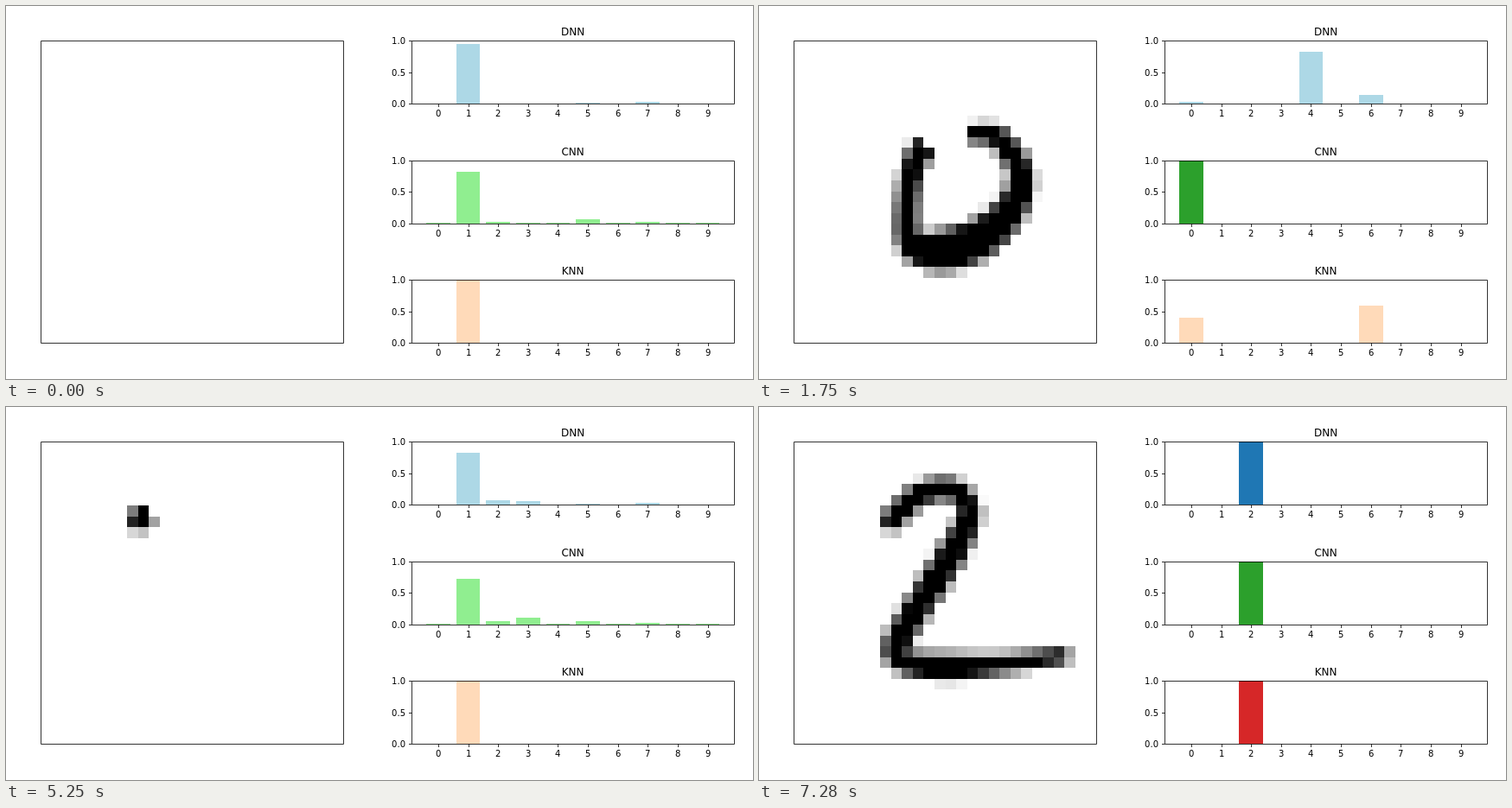
Animation of 864x432 px, one loop 8 s. Source, as an HTML page with a canvas:

```html
<!DOCTYPE html>
<html lang="en">
<head>
<meta charset="utf-8">
<title>Digit classifiers</title>
<style>
html, body { margin: 0; width: 100%; height: 100%; overflow: hidden; background: #fff; }
canvas, svg { position: absolute; left: 0; top: 0; width: 864px; height: 432px; }
svg { font: 10px "DejaVu Sans", sans-serif; }
svg path { fill: none; stroke: #000; stroke-width: .8; }
.title { font-size: 12px; }
</style>
</head>
<body>
<canvas id="stage" width="864" height="432"></canvas>
<svg id="axes" viewBox="0 0 864 432"></svg>
<script>
const LOOP = 8000, STEP = 70;
const GRID = 28, CELL = 351 / GRID;
const FIRST = 499.9, PITCH = 34.63, HEIGHT = 72.84;

const charts = [
  { name: 'DNN', pale: '#add8e6', strong: '#1f77b4' },
  { name: 'CNN', pale: '#90ee90', strong: '#2ca02c' },
  { name: 'KNN', pale: '#ffdab9', strong: '#d62728' }
].map((chart, i) => ({ ...chart, top: 40.3 + i * 138.55 }));

// Scores are given per chart as { digit: score }.
const blank = [
  { 1: .95, 5: .01, 7: .03 },
  { ...Array(10).fill(.01), 1: .82, 2: .02, 5: .06, 7: .02 },
  { 1: 1 }
];

// stroke: key pen positions [x, y, radius] in grid cells, joined by a smooth curve.
// moods: [step, ...scores], blended in between.
const digits = [
  {
    label: 0, start: 0, steps: 30, lead: 1.1,
    stroke: [
      [16.4, 8.7, .75], [18.9, 9.1, 1], [20.9, 12.2, 1.15], [20.3, 15.2, 1.4],
      [17.6, 18.1, 1.8], [13.7, 19.5, 1.9], [10.8, 18.7, 1.2], [10.6, 14.2, 1],
      [11.6, 10.6, 1.1], [13.6, 9, 1], [16.4, 8.7, .75]
    ],
    moods: [
      [17, { 2: .22, 4: .03, 7: .74 }, { 0: .12, 2: .83, 6: .01, 9: .02 }, { 2: .4, 3: .2, 7: .4 }],
      [25, { 0: .03, 4: .82, 6: .14 }, { 0: 1 }, { 0: .4, 6: .6 }],
      [30, { 0: .8, 4: .1, 6: .1 }, { 0: 1 }, { 0: 1 }]
    ]
  },
  {
    label: 1, start: 2940, steps: 18, lead: .5,
    stroke: [
      [17.5, 5.8, .85], [16.6, 10, .85], [15.5, 14, .8], [14.2, 17.8, .75], [14.05, 22.1, .5]
    ],
    moods: [[18, { 1: .84, 7: .16 }, { 1: 1 }, { 1: 1 }]]
  },
  {
    label: 2, start: 5180, steps: 30, lead: -.4,
    stroke: [
      [9.1, 7.3, 1], [11.5, 5.1, 1.05], [14.5, 4.5, 1], [16.2, 6.6, 1.05], [14.6, 10.4, 1.3],
      [11.4, 15.5, 1.25], [9.5, 19, 1.2], [10.6, 20.5, 1.1], [14.5, 20.9, 1.2],
      [19.5, 20.6, .85], [24.7, 19.9, .75]
    ],
    moods: [
      [8, { 2: .51, 3: .41, 5: .05 }, { 2: .23, 3: .77 }, { 1: 1 }],
      [23, { 2: .97, 3: .02 }, { 2: .97, 8: .02 }, { 2: 1 }],
      [30, { 2: 1 }, { 2: 1 }, { 2: 1 }]
    ]
  }
];

const colX = col => Math.round(40 + col * CELL);
const rowY = row => Math.round(39 + row * CELL);
const crisp = v => Math.round(v) + .5;
const mix = (a, b, k) => a + (b - a) * k;

// Catmull-Rom curve through the key points, as dots with their distance along it.
function smooth(points, density = 24) {
  const dots = [];
  const key = i => points[Math.max(0, Math.min(points.length - 1, i))];
  let length = 0;
  for (let n = 0; n <= (points.length - 1) * density; n++) {
    const i = Math.floor(n / density), t = n / density - i;
    const [x, y, radius] = [0, 1, 2].map(axis => {
      const [a, b, c, d] = [-1, 0, 1, 2].map(offset => key(i + offset)[axis]);
      return b + t / 2 * (c - a + t * (2 * a - 5 * b + 4 * c - d + t * (3 * (b - c) + d - a)));
    });
    const last = dots[dots.length - 1];
    if (last) length += Math.hypot(x - last.x, y - last.y);
    dots.push({ x, y, radius, at: length });
  }
  return { dots, length };
}

// Each inked cell keeps its darkness and the place on the stroke that inks it most.
function rasterize(digit) {
  const { dots, length } = smooth(digit.stroke);
  digit.length = length;
  digit.cells = [];
  for (let row = 0; row < GRID; row++) for (let col = 0; col < GRID; col++) {
    let ink = 0, at = 0;
    for (const dot of dots) {
      const here = dot.radius + .5 - Math.hypot(col + .5 - dot.x, row + .5 - dot.y);
      if (here > ink) { ink = here; at = dot.at; }
    }
    if (ink > .02) digit.cells.push({ col, row, at, shade: Math.round(255 * (1 - Math.min(1, ink))) });
  }
}

function scoresAt(digit, index, step) {
  const moods = [[0, ...blank], ...digit.moods];
  const next = Math.max(1, moods.findIndex(mood => mood[0] >= step));
  const from = moods[next - 1], to = moods[next];
  const k = (step - from[0]) / (to[0] - from[0]);
  return Array.from({ length: 10 }, (_, i) => {
    const score = mix(from[index + 1][i] || 0, to[index + 1][i] || 0, k);
    return index === 2 ? Math.round(score * 5) / 5 : score; // five neighbours vote
  });
}

function buildAxes() {
  const text = (x, y, anchor, label, name = '') =>
    `<text class="${name}" x="${x}" y="${y}" text-anchor="${anchor}">${label}</text>`;
  let lines = 'M40.5 40.5h350v350h-350z', labels = '';
  for (const { name, top } of charts) {
    const ceiling = crisp(top), floor = crisp(top + HEIGHT);
    lines += `M469.5 ${ceiling}H842.5V${floor}H469.5z`;
    labels += text(655.6, ceiling - 6.5, 'middle', name, 'title');
    for (const value of [0, .5, 1]) {
      const y = crisp(top + HEIGHT * (1 - value));
      lines += `M469.5 ${y}h-3.5`;
      labels += text(462, y + 3.5, 'end', value.toFixed(1));
    }
    for (let i = 0; i < 10; i++) {
      const x = crisp(FIRST + i * PITCH);
      lines += `M${x} ${floor}v3.5`;
      labels += text(x - .3, floor + 14.5, 'middle', i);
    }
  }
  document.getElementById('axes').innerHTML = `<path d="${lines}"/>${labels}`;
}

const ctx = document.getElementById('stage').getContext('2d');

function fillBox(color, left, top, right, bottom) {
  ctx.fillStyle = color;
  ctx.fillRect(left, top, right - left, bottom - top);
}

function drawDigit(digit, step) {
  if (!step) return;
  const reach = step === digit.steps ? Infinity : step / digit.steps * digit.length + digit.lead;
  for (const { col, row, at, shade } of digit.cells) {
    if (at > reach) continue;
    fillBox(`rgb(${shade},${shade},${shade})`, colX(col), rowY(row), colX(col + 1), rowY(row + 1));
  }
}

function drawBars(digit, step) {
  charts.forEach(({ top, pale, strong }, index) => {
    const scores = scoresAt(digit, index, step), peak = Math.max(...scores);
    const base = top + HEIGHT;
    scores.forEach((score, i) => {
      const color = score === peak && i === digit.label ? strong : pale;
      const edge = side => Math.round(FIRST + (i + side * .4) * PITCH);
      fillBox(color, edge(-1), Math.round(base - score * HEIGHT), edge(1), Math.round(base));
    });
  });
}

function tick() {
  const time = performance.now() % LOOP;
  const digit = digits.filter(d => time >= d.start).pop();
  const step = Math.min(digit.steps, Math.floor((time - digit.start) / STEP));
  ctx.clearRect(0, 0, 864, 432);
  drawDigit(digit, step);
  drawBars(digit, step);
  requestAnimationFrame(tick);
}

digits.forEach(rasterize);
buildAxes();
tick();
</script>
</body>
</html>
```
